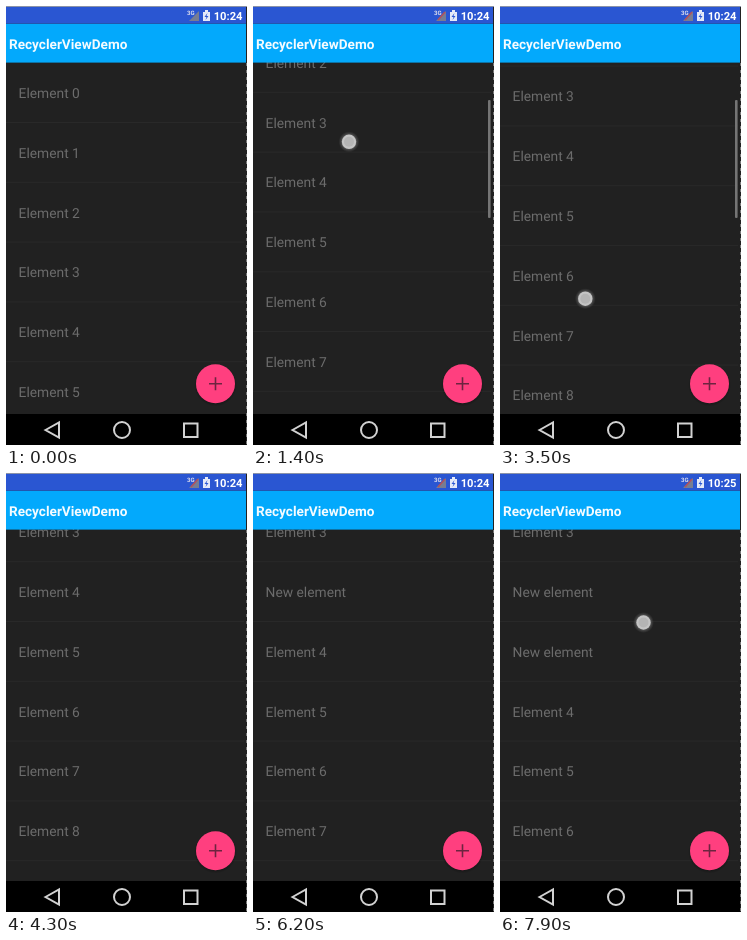
Animation of 241x439 px, one loop 8000 ms. Source, as an HTML page:

```html
<!DOCTYPE html>
<html lang="en">
<head>
<meta charset="utf-8">
<title>RecyclerViewDemo</title>
<style>
  html, body { margin: 0; width: 100%; height: 100%; overflow: hidden; background: #212121; }
  svg { display: block; width: 241px; height: 439px; font-family: Roboto, sans-serif; text-rendering: geometricPrecision; }
  .row text { font-size: 13.8px; fill: #6c6c6c; }
  .row path { stroke: #292929; }
  .nav { fill: none; stroke: #d2d2d2; stroke-width: 2; }
</style>
</head>
<body>
<svg viewBox="0 0 241 439">
  <defs>
    <radialGradient id="glow">
      <stop offset=".6" stop-color="#777" stop-opacity=".8"/>
      <stop offset="1" stop-color="#555" stop-opacity="0"/>
    </radialGradient>
    <radialGradient id="shade">
      <stop offset=".8" stop-opacity=".35"/>
      <stop offset="1" stop-opacity="0"/>
    </radialGradient>
  </defs>
  <rect width="241" height="439" fill="#212121"/>
  <g id="list"></g>
  <rect id="bar" x="235" width="2.6" height="118" rx="1" fill="#757575"/>
  <path d="M240.5 57V439" stroke="#777" stroke-dasharray="3 4"/>

  <circle cx="209.5" cy="379" r="21.5" fill="url(#shade)"/>
  <circle cx="209.5" cy="377.7" r="19.5" fill="#ff3f7f"/>
  <circle id="ripple" cx="209.5" cy="377.7" fill="#fff"/>
  <path d="M203 377.7h13M209.5 371.2v13" stroke="#6d2440" stroke-width="1.6"/>

  <rect y="17.6" width="240" height="39" fill="#03a9fc"/>
  <text x="3" y="42.6" font-size="13.6" font-weight="700" fill="#f4fbff">RecyclerViewDemo</text>

  <rect width="240" height="17.6" fill="#2a56d2"/>
  <path d="M0 .5H241" stroke="#8b93a8"/>
  <text x="181" y="9" font-size="6" font-weight="700" fill="#dde">3G</text>
  <path d="M193 5v10h-10z" fill="#777d92"/>
  <path id="slash" d="M185 14l7-8" stroke="#b0525e" stroke-width="1.6"/>
  <path d="M197 6h2v-2h3v2h2v9h-7z" fill="#e4e9f8"/>
  <path d="M201.5 7l-3 4h2l-1 3 3-4h-2z" fill="#2a56d2"/>
  <text id="clock" x="207.7" y="13.6" font-size="11.2" font-weight="700" fill="#fff"></text>

  <rect y="408" width="240" height="31"/>
  <g class="nav">
    <path d="M39.5 424L53 416.5v15z"/>
    <circle cx="116" cy="424" r="8"/>
    <rect x="178" y="417.5" width="13.5" height="13.5"/>
  </g>

  <g id="touch">
    <circle r="10.5" fill="url(#glow)"/>
    <circle r="7.2" fill="#c4c4c4"/>
    <circle r="5" fill="#b4b4b4"/>
  </g>
</svg>
<script>
const LOOP = 8000, TOP = 57, ROW = 59.8, INSERT_AT = 4;
const PRESSES = [5400, 6600];
const $ = id => document.getElementById(id);
const clamp = x => Math.min(1, Math.max(0, x));
const progress = (t, start, length) => clamp((t - start) / length);
const easeInOut = p => (1 - Math.cos(Math.PI * p)) / 2;
const easeIn = p => p * p;
const easeOut = p => 1 - (1 - p) ** 2;
const linear = p => p;

// Keys are [time, value, easing of the segment that ends here].
function track(keys, t) {
  let [time, value] = keys[0];
  for (const [end, next, ease = linear] of keys.slice(1)) {
    if (t < end) return value + (next - value) * ease(progress(t, time, end - time));
    [time, value] = [end, next];
  }
  return value;
}

const SCROLL = [[500, 0], [900, 26, easeIn], [1400, 149.5], [1550, 186],
  [2100, 254, easeOut], [2600, 254], [3500, 176, easeInOut], [3800, 207.2, easeInOut]];

// Each touch lasts from start to end; x and y are tracks.
const TOUCHES = [
  { start: 300, end: 1550, x: [[500, 88], [900, 91], [1400, 96], [1550, 97]],
    y: [[500, 288], [900, 241, easeIn], [1400, 136], [1550, 104]] },
  { start: 2300, end: 3900, x: [[2300, 85.3]],
    y: [[2600, 213], [3500, 292.7, easeInOut], [3800, 262, easeInOut]] },
  ...PRESSES.map(start => ({ start, end: start + 200, x: [[0, 211]], y: [[0, 380]] })),
  { start: 7800, end: LOOP, x: [[0, 143.5]], y: [[0, 149.5]] }
];

function makeRow(label) {
  const row = document.createElementNS('http://www.w3.org/2000/svg', 'g');
  row.setAttribute('class', 'row');
  row.innerHTML = `<text x="12.6" y="35">${label}</text><path d="M0 59.5H238"/>`;
  $('list').append(row);
  return row;
}
const rows = Array.from({ length: 20 }, (_, i) => makeRow('Element ' + i));
const newRows = PRESSES.map(() => makeRow('New element'));

function place(row, index, scroll) {
  row.setAttribute('transform', `translate(0 ${TOP + index * ROW - scroll})`);
}

function draw(t) {
  const scroll = track(SCROLL, t);
  const shifts = PRESSES.map(press => easeInOut(progress(t, press + 300, 250)));
  rows.forEach((row, i) =>
    place(row, i < INSERT_AT ? i : i + shifts[0] + shifts[1], scroll));
  newRows.forEach((row, i) => {
    place(row, INSERT_AT + (i === 0 ? shifts[1] : 0), scroll);
    row.setAttribute('opacity', progress(t, PRESSES[i] + 550, 200));
  });

  // The scrollbar steps by whole rows.
  $('bar').setAttribute('y', TOP + 2 + Math.floor(scroll / ROW) * 17.5);
  $('bar').setAttribute('opacity', t < 600 ? 0 : 1 - progress(t, 4050, 250));

  const press = PRESSES.findLast(start => t >= start) ?? -LOOP;
  $('ripple').setAttribute('r', 19.5 * easeOut(progress(t, press, 300)));
  $('ripple').setAttribute('opacity', 0.22 * (1 - progress(t, press + 300, 400)));

  const touch = TOUCHES.find(({ start, end }) => t >= start && t < end);
  $('touch').setAttribute('visibility', touch ? 'visible' : 'hidden');
  if (touch) {
    $('touch').setAttribute('transform', `translate(${track(touch.x, t)} ${track(touch.y, t)})`);
  }

  $('slash').setAttribute('opacity', t < 100 ? 0 : 1);
  $('clock').textContent = t < 7800 ? '10:24' : '10:25';
}

const began = performance.now();
function frame() {
  draw((performance.now() - began) % LOOP);
  requestAnimationFrame(frame);
}
frame();
</script>
</body>
</html>
```
